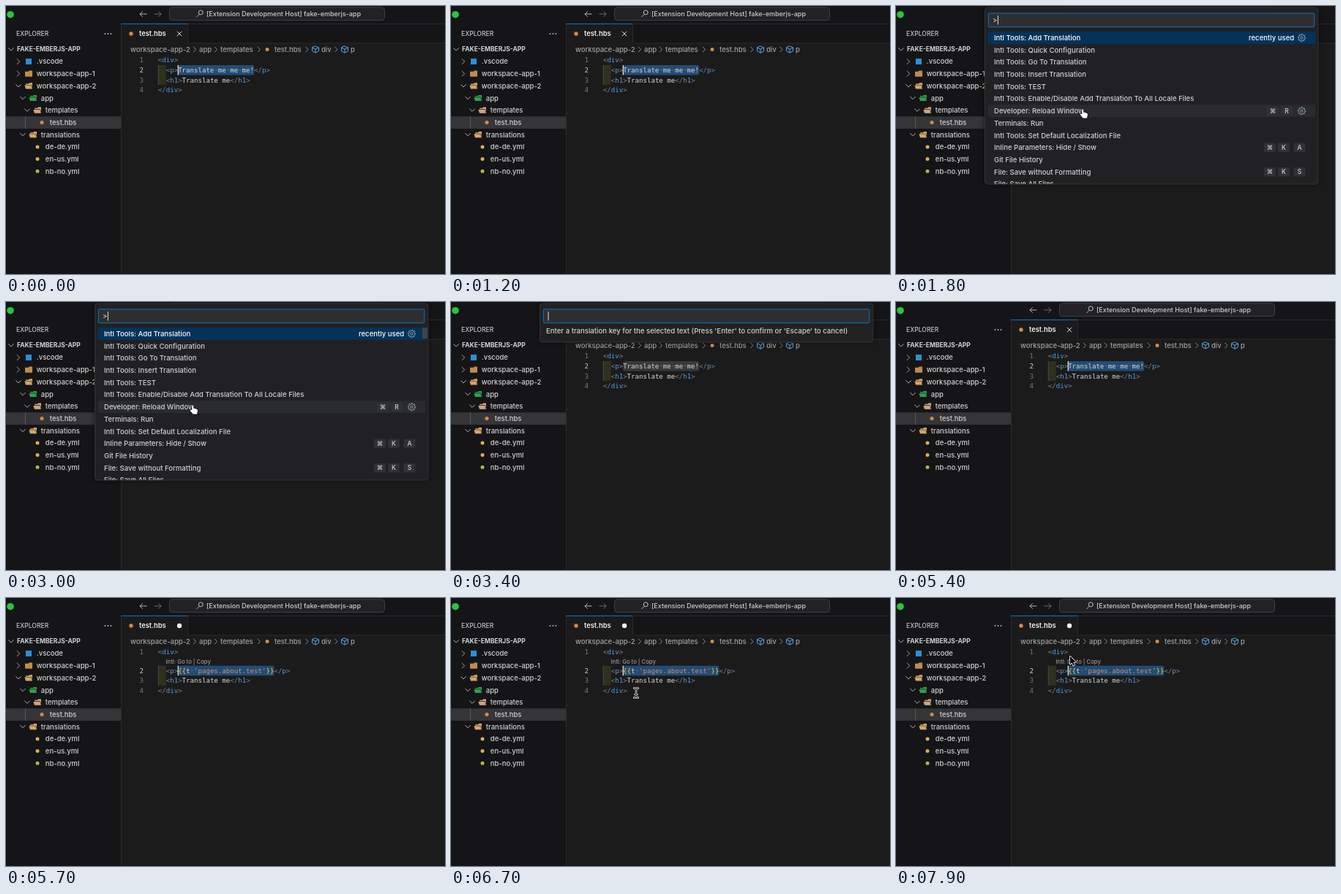
An HTML page with a canvas for the animation above (8000 ms loop, 600 by 367 pixels).

```html
<!DOCTYPE html>
<html lang="en">
<head>
<meta charset="utf-8">
<style>
  html, body { margin: 0; width: 100%; height: 100%; overflow: hidden; background: #151517; }
  canvas { display: block; width: 600px; height: 367px; }
</style>
</head>
<body>
<canvas></canvas>
<script>
const LOOP = 8000;
const PALETTE_OPEN = 1700, PROMPT_OPEN = 3300, KEY_ENTERED = 3700, PROMPT_CLOSE = 5400, REPLACED = 5500;
const UI = 'Inter, sans-serif', MONO = '"DejaVu Sans Mono", monospace';
const SIDE = '#151517', EDITOR = '#1b1b1c', LINE = '#2a2a2b', BLUE = '#0b76c6';
const CODE_X = 207.8, CHAR_W = 5.47, ROW_H = 16.7;
const KEY = 'pages.about.test';

const canvas = document.querySelector('canvas');
const c = canvas.getContext('2d');
const dpr = window.devicePixelRatio || 1;
canvas.width = 600 * dpr;
canvas.height = 367 * dpr;

function rect(x, y, w, h, fill, radius = 0, stroke) {
  c.beginPath();
  c.roundRect(x, y, w, h, radius);
  if (fill) { c.fillStyle = fill; c.fill(); }
  if (stroke) { c.strokeStyle = stroke; c.lineWidth = 1; c.stroke(); }
}

function text(str, x, y, color, size = 9.55, weight = 500, family = UI, align = 'left') {
  c.font = `${weight} ${size}px ${family}`;
  c.textAlign = align;
  c.fillStyle = color;
  c.fillText(str, x, y + size * 0.36);
}

function code(str, x, y, color, align) {
  text(str, x, y, color, 9.08, 400, MONO, align);
}

function shape(d, x, y, { fill, stroke, width = 1 }) {
  const path = new Path2D(d);
  c.save();
  c.translate(x, y);
  c.lineJoin = c.lineCap = 'round';
  if (stroke) { c.strokeStyle = stroke; c.lineWidth = width; c.stroke(path); }
  if (fill) { c.fillStyle = fill; c.fill(path); }
  c.restore();
}

function dot(x, y, r, color) {
  c.beginPath();
  c.arc(x, y, r, 0, 7);
  c.fillStyle = color;
  c.fill();
}

const right = (x, y, color = '#a0a0a2') => shape('M-1.8-3.4L1.6 0L-1.8 3.4', x, y, { stroke: color });
const down = (x, y) => shape('M-3.4-1.8L0 1.6L3.4-1.8', x, y, { stroke: '#b0b0b2' });
const cube = (x, y) => shape('M0-4.5L4.5-2.4V2.2L0 4.5L-4.5 2.2V-2.4ZM-4.5-2.4L0-.2L4.5-2.4M0-.2V4.5', x, y, { stroke: '#5aa7dc' });

function folder(x, y, color, open) {
  if (!open) return shape('M-5-3H-.5L.5-4.2H5V4H-5Z', x, y, { fill: color });
  shape('M-4-1V-3H0L1-4.2H5V4H-4Z', x, y, { fill: color });
  shape('M-5.6-.9H3.4L5 4H-4Z', x, y, { fill: color, stroke: SIDE, width: 1.2 });
}

function gear(x, y) {
  c.beginPath();
  for (let i = 0; i <= 32; i++) {
    const a = i / 32 * Math.PI * 2, r = i % 4 < 2 ? 5.1 : 3.9;
    c.lineTo(x + r * Math.cos(a), y + r * Math.sin(a));
  }
  c.moveTo(x + 1.6, y);
  c.arc(x, y, 1.6, 0, 7);
  c.strokeStyle = '#b9c4cc';
  c.lineWidth = 0.8;
  c.stroke();
}

// Explorer rows: label, depth, icon kind, icon colour
const TREE = [
  ['.vscode', 0, 'mark', '#2d8fd5'],
  ['workspace-app-1', 0, 'closed', '#bd8c4c'],
  ['workspace-app-2', 0, 'open', '#d2a76c'],
  ['app', 1, 'open', '#2fa04c'],
  ['templates', 2, 'open', '#c9a783'],
  ['test.hbs', 3, 'file', '#d68b4b'],
  ['translations', 1, 'open', '#d2a76c'],
  ['de-de.yml', 2, 'file', '#d9b04c'],
  ['en-us.yml', 2, 'file', '#d9b04c'],
  ['nb-no.yml', 2, 'file', '#b9b24e'],
];

function drawSidebar() {
  rect(0, 0, 600, 367, SIDE);
  dot(6, 11.7, 4.8, '#29c440');
  text('EXPLORER', 14, 38, '#c4c4c6', 8.6);
  for (let i = 0; i < 3; i++) dot(135.5 + i * 4, 38, 0.9, '#c0c0c2');
  down(7, 59.5);
  text('FAKE-EMBERJS-APP', 15, 59.3, '#d2d2d4', 8.5, 700);
  rect(0, 151.2, 157, ROW_H, '#353538');
  rect(26, 151.2, 1, ROW_H, '#58585b');
  TREE.forEach(([label, depth, kind, color], i) => {
    const y = 76 + i * ROW_H, x = 17 + depth * 6;
    if (kind === 'open') down(x, y);
    else if (kind !== 'file') right(x, y);
    if (kind === 'mark') rect(x + 10, y - 4, 8, 8, color);
    else if (kind === 'file') dot(x + 14, y, 2.5, color);
    else folder(x + 14, y, color, kind === 'open');
    text(label, x + 24.8, y, '#d2d2d3', 9.5);
  });
}

function drawWindow(dirty) {
  shape('M4.5 0H-4.5M-1-3.5L-4.5 0L-1 3.5', 187.5, 11, { stroke: '#b5b5b7' });
  shape('M-4.5 0H4.5M1-3.5L4.5 0L1 3.5', 207.5, 11, { stroke: '#6a6a6c' });
  rect(223.5, 2, 294, 17.5, '#222224', 4, '#404042');
  shape('M-1.2 1.2L-4.2 4.2M4.2-1.6A3 3 0 1 1-1.8-1.6A3 3 0 1 1 4.2-1.6', 265, 10.5, { stroke: '#c0c0c2' });
  text('[Extension Development Host] fake-emberjs-app', 274, 10.5, '#cdcdcf', 9);

  rect(157, 24, 443, 343, EDITOR);
  rect(157, 24, 443, 27, SIDE);
  rect(157, 24, 443, 1, LINE);
  rect(157, 50.5, 443, 1, LINE);
  rect(157, 24, 1, 343, LINE);
  rect(158, 24, 90, 28, EDITOR);
  rect(157, 24, 91, 1, BLUE);
  rect(248, 24, 1, 27, LINE);
  dot(171, 38, 2.7, '#d68b4b');
  text('test.hbs', 182, 38, '#f4f4f4', 9.3, 600);
  if (dirty) dot(237, 38, 3.2, '#f2f2f2');
  else shape('M-3-3L3 3M3-3L-3 3', 237, 38, { stroke: '#d8d8d8' });

  const crumbs = [['workspace-app-2', 170], ['app', 264], ['templates', 293], ['test.hbs', 367], ['div', 431], ['p', 471]];
  for (const [label, x] of crumbs) text(label, x, 59.5, '#a4a4a6', 9.5);
  for (const x of [258, 287, 346, 411.5, 451.5]) right(x, 59.5, '#88888a');
  dot(357, 59.5, 2.5, '#d68b4b');
  cube(423, 59.5);
  cube(463, 59.5);
}

function drawCode(column, y, parts) {
  for (const [str, color] of parts) {
    code(str, CODE_X + column * CHAR_W, y, color);
    column += str.length;
  }
}

function drawEditor(replaced, focused, caretOn) {
  const GREY = '#808082', TAG = '#569cd6', PLAIN = '#d8d8da', GOLD = '#f0d32a';
  const tag = (name, close) => [[close ? '</' : '<', GREY], [name, TAG], ['>', GREY]];
  const shift = replaced ? 11.8 : 0;
  const ys = [74, 87.7 + shift, 101.3 + shift, 114.9 + shift];
  const body = replaced
    ? [['{{', GOLD], ['t ', '#dcdcaa'], [`'${KEY}'`, '#ce9178'], ['}}', GOLD]]
    : [['Translate me me me!', PLAIN]];
  const selected = body.map(part => part[0]).join('');
  const selX = CODE_X + 5 * CHAR_W;

  rect(CODE_X, ys[1] - 6.8, 2 * CHAR_W, 27.2, '#30301f');
  rect(CODE_X, ys[1] - 6.8, 1, 27.2, '#4a4a40');
  rect(selX, ys[1] - 6.8, selected.length * CHAR_W, 13.6, focused ? '#244c74' : '#38393b', 2);
  ys.forEach((y, i) => code(i + 1, 188, y, i === 1 ? '#cccccc' : '#6e7681', 'right'));

  drawCode(0, ys[0], tag('div'));
  drawCode(2, ys[1], [...tag('p'), ...body, ...tag('p', true)]);
  drawCode(2, ys[2], [...tag('h1'), ['Translate me', PLAIN], ...tag('h1', true)]);
  drawCode(0, ys[3], tag('div', true));
  [...selected].forEach((ch, i) => {
    if (ch === ' ') dot(selX + (i + 0.5) * CHAR_W, ys[1], 0.6, '#8a949c');
  });
  if (replaced) text('Intl: Go to | Copy', 218.5, 86.8, '#98989a', 7.7);
  if (focused && caretOn) rect(selX - 0.5, ys[1] - 6.8, 1.3, 13.6, '#e4e4e4');
}

function drawQuickInput(height, value, caretOn) {
  c.save();
  c.shadowColor = 'rgba(0,0,0,.6)';
  c.shadowBlur = 7 * dpr;
  rect(121.5, 2, 455.5, height, '#212123', 4);
  c.restore();
  rect(121.5, 2, 455.5, height, null, 4, '#353537');
  rect(126.3, 9.9, 445.5, 18.8, '#2e2e30', 1, BLUE);
  text(value, 132, 19.5, '#d4d4d6');
  if (caretOn) rect(132.5 + c.measureText(value).width, 13, 1, 12.5, '#e0e0e0');
}

function keycaps(keys, xs, y) {
  keys.forEach((key, i) => {
    rect(xs[i] - 8, y - 6.3, 16, 12.6, '#303134', 2);
    text(key, xs[i], y, '#d0d0d2', 8.6, 500, 'Inter, "DejaVu Sans", sans-serif', 'center');
  });
}

const COMMANDS = [
  'Intl Tools: Add Translation', 'Intl Tools: Quick Configuration', 'Intl Tools: Go To Translation',
  'Intl Tools: Insert Translation', 'Intl Tools: TEST',
  'Intl Tools: Enable/Disable Add Translation To All Locale Files', 'Developer: Reload Window',
  'Terminals: Run', 'Intl Tools: Set Default Localization File', 'Inline Parameters: Hide / Show',
  'Git File History', 'File: Save without Formatting', 'File: Save All Files',
];

function drawPalette(t) {
  drawQuickInput(242, '>', (t - PALETTE_OPEN) % 1000 < 500);
  c.save();
  c.beginPath();
  c.rect(122, 30, 455, 213.5);
  c.clip();
  const rowY = i => 43.5 + i * ROW_H;
  rect(125.5, 35.2, 448, ROW_H, '#04335a', 2);
  rect(125.5, rowY(6) - ROW_H / 2, 448, ROW_H, '#292b2d', 2);
  COMMANDS.forEach((name, i) => text(name, 134, rowY(i), i ? '#d2d2d3' : '#ffffff'));
  text('recently used', 482, 43.5, '#ffffff');
  gear(554.5, 43.5);
  gear(554.5, rowY(6));
  keycaps(['⌘', 'R'], [515, 534], rowY(6));
  keycaps(['⌘', 'K', 'A'], [511, 530, 551.5], rowY(9));
  keycaps(['⌘', 'K', 'S'], [511, 530, 551.5], rowY(11));
  c.globalAlpha = Math.min(1, Math.max(0, (t - 2500) / 150));
  rect(569, 35, 7, 15, '#3f4347');
  c.restore();
}

function drawPrompt(t) {
  const typed = t >= KEY_ENTERED;
  drawQuickInput(53, typed ? KEY : '', (t - (typed ? KEY_ENTERED : PROMPT_OPEN)) % 1000 < 500);
  text("Enter a translation key for the selected text (Press 'Enter' to confirm or 'Escape' to cancel)", 130, 39.3, '#d2d2d3', 9.6);
}

const HAND = 'M-2.6-5C-2.6-6.6-.6-6.6-.4-5L0-1.8L.8-2.3L2-1.4L3.2-1.7L4-.7C5.3-.9 5.6 0 5.4 1.5L4.5 5.8H-1L-4.6 1.2C-5.2 0-3.8-.8-2.8.3L-2.1-.2Z';
const IBEAM = 'M-2.8-6.5Q0-6.5 0-4.8Q0-6.5 2.8-6.5M0-4.8V4.8M-2.8 6.5Q0 6.5 0 4.8Q0 6.5 2.8 6.5M-1.3 2H1.3';
const ARROW = 'M0 0V11L2.5 8.7L4.2 12.6L6.1 11.8L4.4 8H7.8Z';

const ease = (t, from, to) => {
  const k = Math.min(1, Math.max(0, (t - from) / (to - from)));
  return k * k * (3 - 2 * k);
};

function drawPointer(t) {
  if (t >= PALETTE_OPEN && t < PROMPT_OPEN) {
    shape(HAND, 256.5, 147.7, { fill: '#ffffff', stroke: '#111111', width: 1.6 });
  } else if (t >= 6300) {
    const a = ease(t, 6300, 6600), b = ease(t, 6700, 7700);
    const x = 256 - 3 * a - 15 * b, y = 147 - 17 * a - 50.2 * b;
    if (y < 93) {
      shape(ARROW, x, y, { fill: '#000000', stroke: '#ffffff', width: 1.6 });
    } else {
      shape(IBEAM, x, y, { stroke: '#f0f0f0', width: 2.6 });
      shape(IBEAM, x, y, { stroke: '#111111' });
    }
  }
}

function draw(t) {
  c.setTransform(dpr, 0, 0, dpr, 0, 0);
  const replaced = t >= REPLACED;
  const focused = t < PALETTE_OPEN || t >= PROMPT_CLOSE;
  const caretOn = (replaced ? t - REPLACED : t) % 1000 < 500;
  drawSidebar();
  drawWindow(replaced);
  drawEditor(replaced, focused, caretOn);
  if (t >= PALETTE_OPEN && t < PROMPT_OPEN) drawPalette(t);
  else if (t >= PROMPT_OPEN && t < PROMPT_CLOSE) drawPrompt(t);
  drawPointer(t);
}

const start = performance.now();
function frame() {
  draw((performance.now() - start) % LOOP);
  requestAnimationFrame(frame);
}
frame();
</script>
</body>
</html>
```
